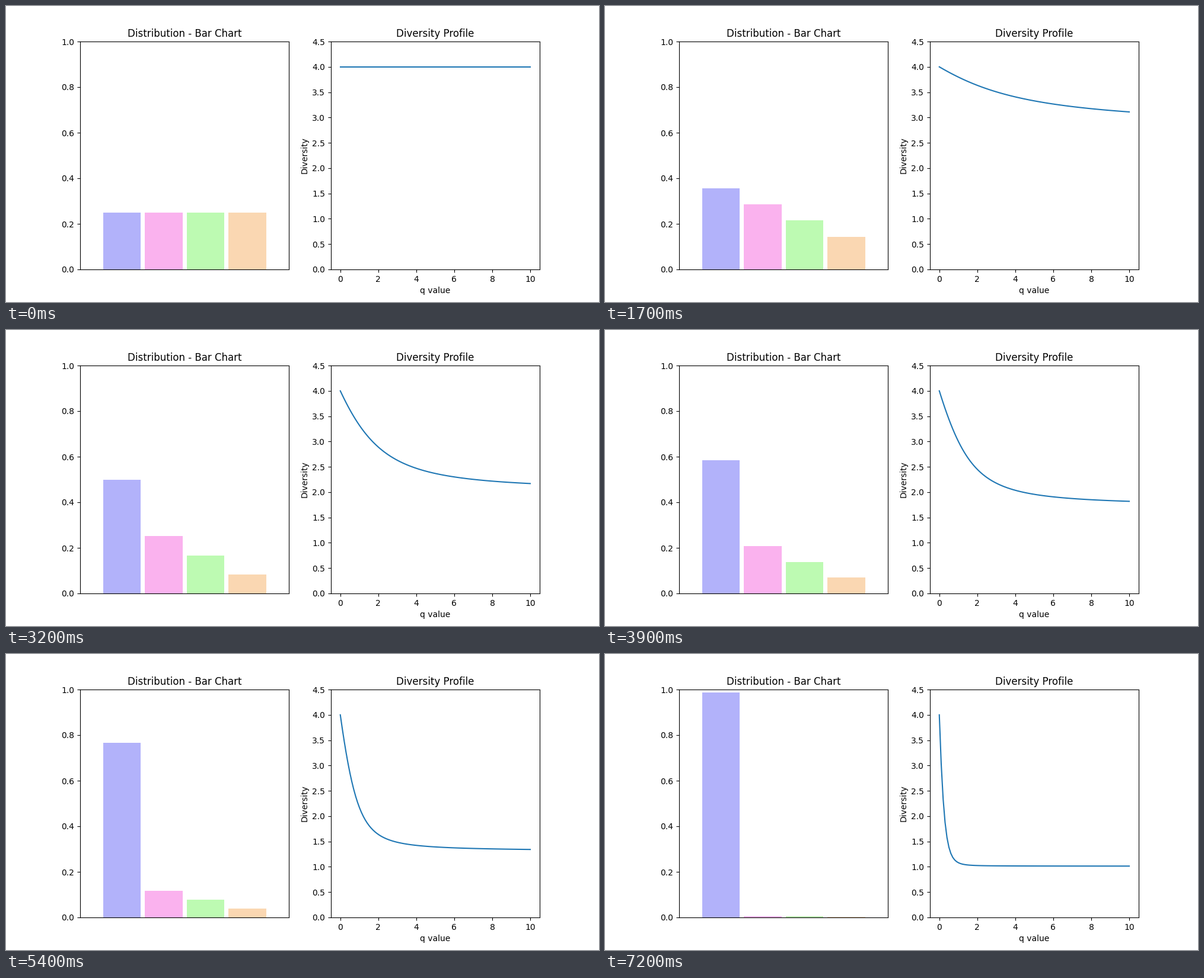
Recreate the animation shown at these times as a matplotlib script. Size 1000 px wide and 500 px high, loop 7300 ms.

```python
import numpy as np
import matplotlib.pyplot as plt
from matplotlib.animation import FuncAnimation

FRAMES = 73
INTERVAL = 100
RAMP_STEPS = 24
EVEN = np.full(4, 0.25)
SLOPED = np.array([0.4, 0.3, 0.2, 0.1])
SINGLE = np.array([1.0, 0.0, 0.0, 0.0])
COLORS = ["#b2b2fa", "#fab2ee", "#bdfab2", "#fad7b2"]

# 100 evenly spaced orders; none of them lands on the singular q = 1
orders = np.linspace(0, 10, 100)


def blend(start, end, t):
    return (1 - t) * start + t * end


def distribution(frame):
    if frame <= RAMP_STEPS:
        return blend(EVEN, SLOPED, frame / RAMP_STEPS)
    return blend(SLOPED, SINGLE, (frame - RAMP_STEPS) / (FRAMES - RAMP_STEPS))


def diversity(shares):
    """Hill number of every order."""
    sums = (shares[:, None] ** orders).sum(axis=0)
    return sums ** (1 / (1 - orders))


fig, (bar_ax, profile_ax) = plt.subplots(1, 2, figsize=(10, 5), dpi=100)

bars = bar_ax.bar(range(1, 5), EVEN, width=0.9, color=COLORS)
bar_ax.set(title="Distribution - Bar Chart", xlim=(0, 5), ylim=(0, 1), xticks=[])

(profile,) = profile_ax.plot(orders, diversity(EVEN))
profile_ax.set(title="Diversity Profile", xlabel="q value", ylabel="Diversity",
               xlim=(-0.5, 10.5), ylim=(0, 4.5))


def update(frame):
    shares = distribution(frame)
    for bar, share in zip(bars, shares):
        bar.set_height(share)
    profile.set_ydata(diversity(shares))
    return [*bars, profile]


animation = FuncAnimation(fig, update, frames=FRAMES, interval=INTERVAL,
                          repeat=True, repeat_delay=0)
plt.show()
```
